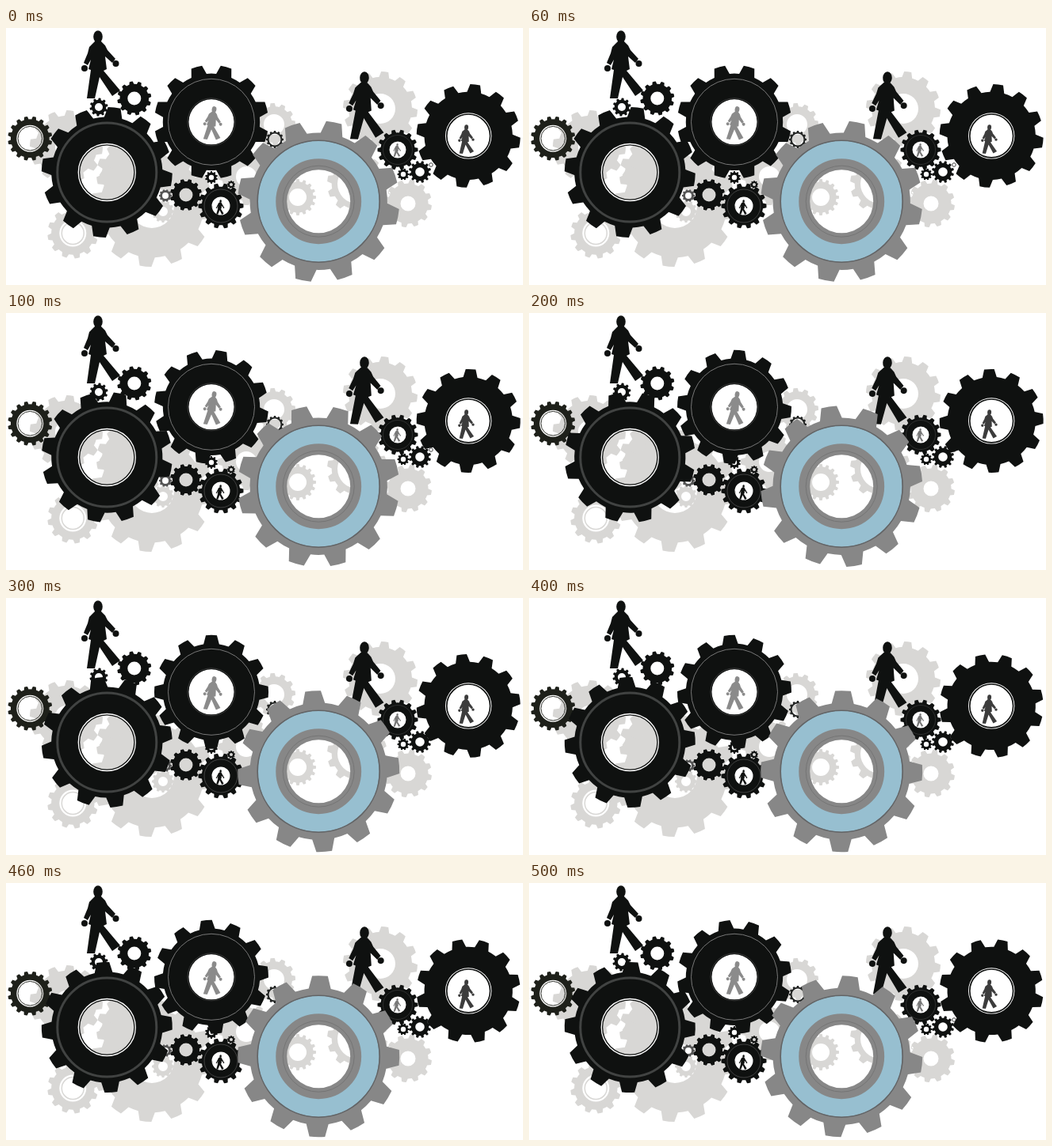
Recreate the animation shown at these times as an HTML page with a canvas. Size 652 by 325 pixels, loop 0.6 s.

```html
<!DOCTYPE html>
<html lang="en">
<head>
<meta charset="utf-8">
<title>Turning gears</title>
<style>
html, body { margin: 0; width: 100%; height: 100%; overflow: hidden; background: #fff; }
canvas { display: block; }
</style>
</head>
<body>
<canvas id="stage" width="652" height="325"></canvas>
<script>
const ctx = document.getElementById('stage').getContext('2d');
const TAU = Math.PI * 2;
const RAD = Math.PI / 180;
const INK = '#0f1110', PALE = '#d8d7d5', STEEL = '#878787', WHITE = '#fff';
const STEP = 100, STEPS = 6;

// Gear with tapered teeth and an open hub; angle (degrees) is the centre of one tooth.
function gear(x, y, r, hole, teeth, angle, color, depth = 0.15) {
  const root = r * (1 - depth), pitch = TAU / teeth;
  ctx.beginPath();
  for (let i = 0; i < teeth; i++) {
    const a = angle * RAD + i * pitch;
    ctx.arc(x, y, root, a - pitch * 0.69, a - pitch * 0.31);
    ctx.arc(x, y, r, a - pitch * 0.185, a + pitch * 0.185);
  }
  ctx.closePath();
  ctx.moveTo(x + hole, y);
  ctx.arc(x, y, hole, 0, TAU);
  ctx.fillStyle = color;
  ctx.fill('evenodd');
}

function ring(x, y, r, width, color) {
  ctx.beginPath();
  ctx.arc(x, y, r, 0, TAU);
  ctx.lineWidth = width;
  ctx.strokeStyle = color;
  ctx.stroke();
}

function disc(x, y, r, color) {
  ctx.beginPath();
  ctx.arc(x, y, r, 0, TAU);
  ctx.fillStyle = color;
  ctx.fill();
}

const BODY = new Path2D(
  'M-4 6L4 6L9 11L12 17L22 28L18 33L9 25L11 41L7 43L28 68L18 75L2 51L-4 78' +
  'L-14 78L-9 42L-12 41L-9 29L-13 36L-18 33L-13 21L-11 13L-8 10Z');

// Walking figure placed by the centre of its head, leaning by tilt degrees.
function walker(x, y, scale, tilt, color) {
  ctx.save();
  ctx.translate(x, y);
  ctx.rotate(tilt * RAD);
  ctx.scale(scale, scale);
  ctx.fillStyle = color;
  ctx.fill(BODY);
  ctx.beginPath();
  ctx.ellipse(0, 0, 5.8, 7.8, 0, 0, TAU);
  ctx.fill();
  disc(-17, 40, 4, color);
  disc(22.5, 34, 4, color);
  ctx.restore();
}

function paleGears() {
  gear(76, 150, 46, 14, 12, -84, PALE);
  gear(160, 185, 46, 0, 12, 200, PALE);
  gear(184, 225, 77, 28, 12, 96, PALE);
  gear(198, 232, 14, 6, 12, 0, PALE);
  gear(84.3, 259.5, 32, 17, 12, 80, PALE);
  ring(84.3, 259.5, 14, 1.5, PALE);
  gear(303, 188, 36, 13, 12, 0, PALE);
  gear(338, 122, 27, 13, 12, -94, PALE);
  gear(368, 214, 23, 11, 16, 0, PALE);
  gear(443, 197, 38, 25, 12, 190, PALE);
  gear(472, 102, 47, 19, 12, -83, PALE);
  gear(507, 222, 30, 9.5, 12, -80, PALE);
  ring(484, 208, 2, 1, PALE);
}

function smallGears() {
  gear(30.3, 139.7, 28, 17, 16, -101, '#1e201a', 0.13);
  ring(30.3, 139.7, 15.3, 1, '#33352f');
  gear(117, 100, 11.5, 5, 10, -84, INK, 0.2);
  gear(161.8, 89, 21.5, 8.5, 12, -101, INK);
  gear(339, 141, 11, 7.5, 12, 0, '#222423');
  gear(201, 212, 8, 4, 10, 0, '#555');
  gear(227, 211, 20, 8.5, 12, -105, INK);
  gear(259, 189, 8, 3.2, 10, -90, INK, 0.2);
  gear(284, 198, 5, 2, 9, -90, INK, 0.2);
  gear(271, 225, 28.5, 11.5, 14, -103, INK);
  ring(271, 225, 21, 0.7, '#555');
  walker(270.6, 219, 0.22, 8, INK);
  gear(494, 154, 25.5, 10.5, 14, -103, INK);
  ring(494, 154, 18.5, 0.6, '#444');
  walker(493.6, 147.5, 0.2, 8, '#777');
  gear(501, 185, 7.5, 3.2, 10, 0, INK, 0.2);
  gear(522, 182, 14, 5.8, 12, 15, INK, 0.2);
  ring(536, 173, 2.3, 1, '#444');
}

function topGear(turn) {
  gear(259, 118.8, 72, 28, 12, -75 - turn, INK);
  ring(259, 118.8, 54.5, 1, '#777');
  disc(259, 118.8, 28.5, WHITE);
  ring(259, 118.8, 30, 0.6, '#555');
  walker(262.5, 103, 0.5, 10, '#8b8b8b');
}

function leftGear(turn) {
  gear(127.3, 182.5, 82.5, 34, 12, -83.5 + turn, INK);
  ring(127.3, 182.5, 62.5, 3, '#414342');
  ring(127.3, 182.5, 36, 1.3, WHITE);
}

function rightGear(turn) {
  gear(583.2, 136.4, 65.5, 27, 12, -82.5 - turn, INK);
  disc(583.2, 136.4, 29.2, WHITE);
  ring(583.2, 136.4, 27.4, 1.7, INK);
  walker(580.6, 125.7, 0.43, 5, '#3c3c3c');
}

function blueGear(turn) {
  gear(394.2, 219.2, 102, 40, 12, -79 + turn, STEEL);
  ring(394.2, 219.2, 65.2, 22.5, '#97bfd0');
  ring(394.2, 219.2, 77, 1.6, '#626466');
  ring(394.2, 219.2, 45, 1, '#757575');
}

function draw(now) {
  const turn = Math.floor(now / STEP) % STEPS * 30 / STEPS;
  ctx.fillStyle = WHITE;
  ctx.fillRect(0, 0, 652, 325);
  paleGears();
  smallGears();
  walker(116, 11, 1, 0, INK);
  walker(452, 63, 1, 3, INK);
  topGear(turn);
  leftGear(turn);
  rightGear(turn);
  blueGear(turn);
}

function loop() {
  draw(performance.now());
  requestAnimationFrame(loop);
}
loop();
</script>
</body>
</html>
```
